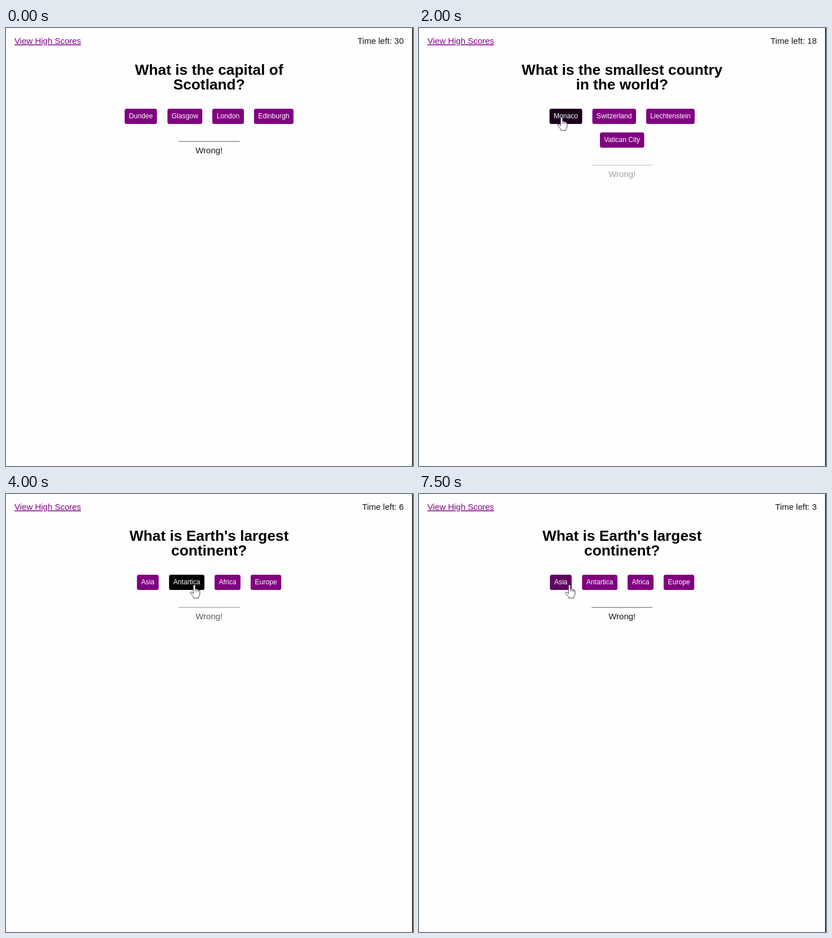
Animation of 722x776 px, one loop 8000 ms. Source, as an HTML page:

```html
<!DOCTYPE html>
<html lang="en">
<head>
<meta charset="utf-8">
<title>Quiz</title>
<style>
  html, body { margin: 0; width: 100%; height: 100%; overflow: hidden; background: #fefefe; }
  svg { display: block; width: 722px; height: 776px; font: 15px "Liberation Sans", Arial, sans-serif; }
  .title { font-size: 26.3px; font-weight: bold; text-anchor: middle; }
  .label { font-size: 12.15px; fill: #fff; text-anchor: middle; }
  .cursor { fill: #fff; stroke: #3c3744; stroke-width: 1; stroke-linejoin: round; }
</style>
</head>
<body>
<svg viewBox="0 0 722 776">
  <rect width="722" height="776" fill="#fefefe"/>
  <rect x="720.5" width="1.5" height="776" fill="#111"/>
  <text x="15" y="28" fill="#800080" text-decoration="underline">View High Scores</text>
  <text id="timer" x="705.5" y="28" text-anchor="end" fill="#16161a"></text>
  <g id="quiz"></g>
  <g id="feedback">
    <rect x="306" y="200.5" width="108.5" height="1" fill="#555"/>
    <text x="360.2" y="222" text-anchor="middle" fill="#16161a">Wrong!</text>
  </g>
  <path id="hand" class="cursor" d="M-1.8 1.4Q-1.6 0 0 0T1.8 1.4V7.5Q3.7 6.2 4.7 8.2Q6.6 7.2 7.4 9Q9.7 8.6 9.8 11V16Q9.6 19 7.7 21V23.3H-1.2V21.6L-6.6 15.2Q-8 13-6 12.6Q-4.4 12.5-1.8 15.3Z M1.8 7.5V11.5M4.7 8.2V11.8M7.4 9V12.2"/>
  <path id="arrow" class="cursor" d="M0 0V17.2L3.9 13.7L6.7 19.6L9.3 18.4L6.7 12.6H12.3Z"/>
</svg>
<script>
const STEP = 500, LOOP = 8000;
const byId = id => document.getElementById(id);

// Each button: label, left edge, width, row
const questions = [
  { title: ["What is the capital of", "Scotland?"], shift: 0,
    buttons: [["Dundee", 210.5, 57.3, 0], ["Glasgow", 286.4, 61.8, 0], ["London", 366, 56, 0], ["Edinburgh", 440, 70, 0]] },
  { title: ["What is the smallest country", "in the world?"], shift: 42,
    buttons: [["Monaco", 231.5, 58, 0], ["Switzerland", 307.5, 77.5, 0], ["Liechtenstein", 403, 86, 0], ["Vatican City", 321, 78.5, 1]] },
  { title: ["What is Earth's largest", "continent?"], shift: 0,
    buttons: [["Asia", 232.3, 38.5, 0], ["Antartica", 289.3, 62.7, 0], ["Africa", 370, 46, 0], ["Europe", 434, 54.3, 0]] }
];

// One entry per step; dark maps a button index to its hover progress
const steps = [
  { q: 0, time: 30 },
  { q: 0, time: 30 },
  { q: 0, time: 29, hand: [291, 153], dark: { 1: .3 } },
  { q: 0, time: 29, hand: [254, 158], dark: { 0: 1 } },
  { q: 1, time: 18, hand: [253, 158], dark: { 0: .8 }, fade: .4 },
  { q: 1, time: 18, hand: [253, 158], dark: { 0: 1 } },
  { q: 1, time: 18, hand: [312, 159.5], dark: { 0: .82 } },
  { q: 1, time: 17, hand: [333, 161], dark: { 1: 1 } },
  { q: 2, time: 6, hand: [334, 161], dark: { 1: 1 }, fade: .7 },
  { q: 2, time: 6, hand: [334, 161], dark: { 1: 1 } },
  { q: 2, time: 5, arrow: [328, 215.5], dark: { 1: .3 } },
  { q: 2, time: 5, arrow: [323, 229.5] },
  { q: 2, time: 5, arrow: [323, 229.3] },
  { q: 2, time: 4, arrow: [321, 224.5] },
  { q: 2, time: 3, arrow: [302, 186] },
  { q: 2, time: 3, hand: [267, 161], dark: { 0: .25 } }
];

function buttonMarkup([label, x, width, row], dark = 0) {
  const y = 143 + row * 42, tone = Math.round(128 * (1 - dark));
  return `<rect x="${x}" y="${y}" width="${width}" height="27" rx="3.6" fill="rgb(${tone},0,${tone})"/>
    <text class="label" x="${x + width / 2}" y="${y + 17.4}">${label}</text>`;
}

function place(id, point) {
  const node = byId(id);
  node.style.display = point ? "" : "none";
  if (point) node.setAttribute("transform", `translate(${point})`);
}

function render({ q, time, hand, arrow, dark = {}, fade = 1 }) {
  const { title, shift, buttons } = questions[q];
  byId("timer").textContent = `Time left: ${time}`;
  byId("quiz").innerHTML =
    title.map((line, i) => `<text class="title" x="360.2" y="${82.7 + i * 26.4}">${line}</text>`).join("") +
    buttons.map((button, i) => buttonMarkup(button, dark[i])).join("");
  byId("feedback").setAttribute("transform", `translate(0 ${shift})`);
  byId("feedback").setAttribute("opacity", fade);
  place("hand", hand);
  place("arrow", arrow);
}

const start = performance.now();
let shown = -1;
function tick(now) {
  const index = Math.floor(Math.max(0, now - start) % LOOP / STEP);
  if (index !== shown) render(steps[shown = index]);
  requestAnimationFrame(tick);
}
tick(start);
</script>
</body>
</html>
```
